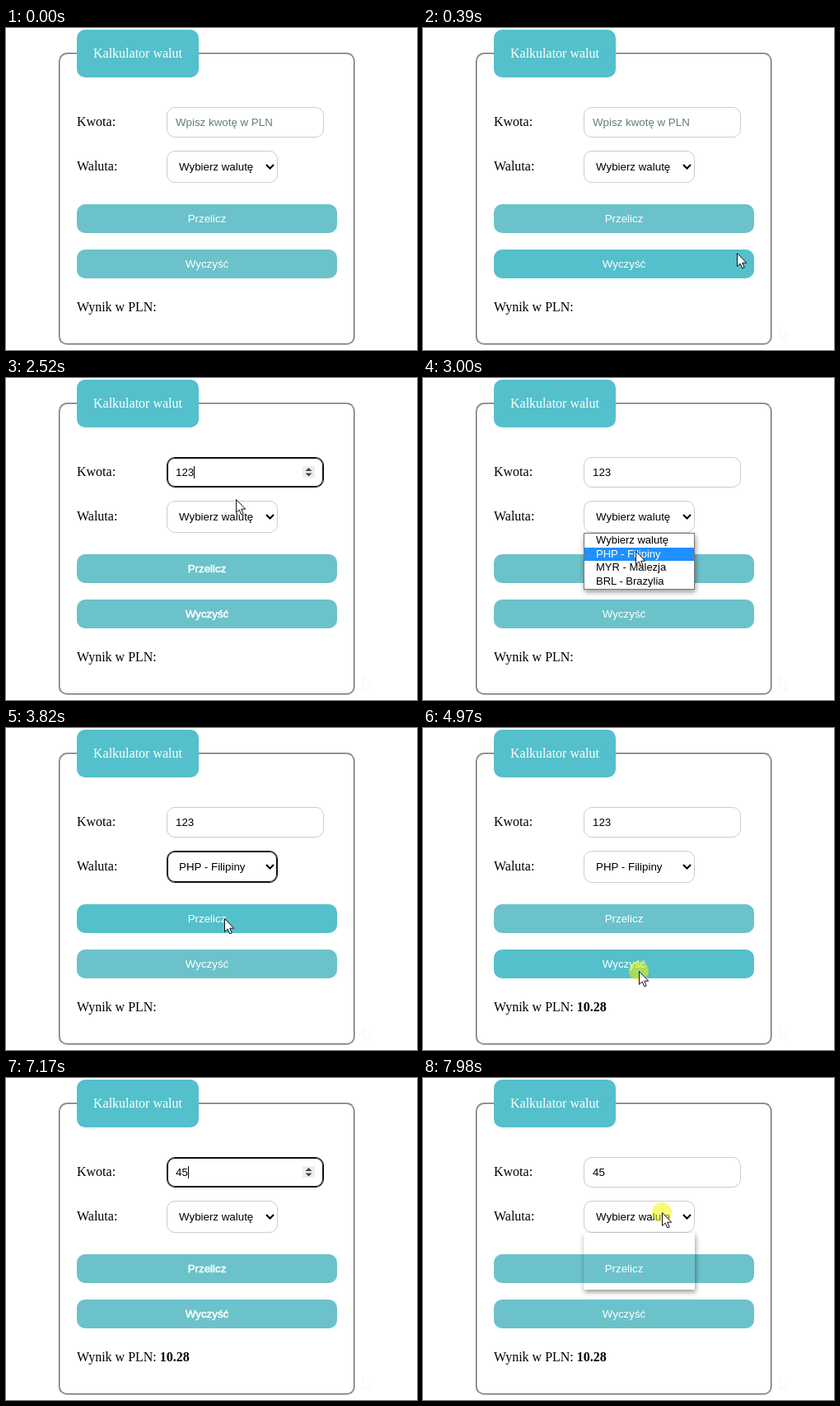
These frames come from a looping animation (499 by 391 pixels, 8000 ms). An HTML page:

```html
<!DOCTYPE html>
<html lang="pl">
<head>
<meta charset="utf-8">
<style>
html, body { margin: 0; width: 100%; height: 100%; overflow: hidden; background: #fff; }
#stage { position: relative; width: 499px; height: 391px; overflow: hidden; color: #000; }
#stage div, svg { position: absolute; box-sizing: border-box; white-space: pre; }
.serif { font: 16px/18px "Liberation Serif", "Times New Roman", serif; left: 86px; }
.sans { font: 13.333px/35px "Liberation Sans", Arial, sans-serif; }
#form { left: 64px; top: 30px; width: 360px; height: 355px; border: 2px groove #c0c0c0; border-radius: 10px; }
#legend { top: 2px; width: 148px; height: 58px; line-height: 58px; text-align: center; color: #fff; background: #54c0cb; border-radius: 10px; }
.field { left: 195px; border: 1px solid #ccc; border-radius: 10px; background: #fff; }
.field.focus { border-color: #101010; box-shadow: inset 0 0 0 1px #101010; }
#amount { top: 96px; width: 191px; height: 37px; padding-left: 10px; }
#amount.empty { color: #637d78; }
#currency { top: 149px; width: 135px; height: 39px; line-height: 37px; padding-left: 14px; }
#caret { top: 107px; width: 1px; height: 15px; background: #000; }
.button { left: 86px; width: 316px; height: 35px; border-radius: 10px; text-align: center; color: #fff; background: #6cc2ca; }
.button.hover { background: #54c0cb; }
.heavy { -webkit-text-stroke: .5px #fff; }
#list { left: 195px; top: 188px; width: 135px; height: 69px; border: 1px solid transparent; box-shadow: 1px 3px 6px rgba(0,0,0,.4); font-size: 13px; line-height: 16.6px; }
#list.open { background: #fff; border-color: #777; }
#list p { margin: 0; padding-left: 14px; visibility: hidden; }
#list.open p { visibility: visible; }
#list p.on { color: #fff; background: #1e90ff; }
</style>
</head>
<body>
<div id="stage">
  <div id="form"></div>
  <div id="legend" class="serif">Kalkulator walut</div>
  <div class="serif" style="top:105px">Kwota:</div>
  <div class="serif" style="top:159px">Waluta:</div>
  <div class="serif" style="top:330px">Wynik w PLN: <b id="result"></b></div>
  <div id="amount" class="field sans"></div>
  <div id="caret"></div>
  <div id="currency" class="field sans"></div>
  <div id="convert" class="button sans" style="top:214px">Przelicz</div>
  <div id="clear" class="button sans" style="top:269px">Wyczyść</div>
  <div id="list" class="sans"><p>Wybierz walutę</p><p>PHP - Filipiny</p><p>MYR - Malezja</p><p>BRL - Brazylia</p></div>
  <svg width="499" height="391" style="left:0;top:0">
    <path d="M316 166l4.5 4.5 4.5-4.5" fill="none" stroke="#000" stroke-width="2"/>
    <g id="spinner"><path d="M360 107h15v14h-15z" fill="#eee"/><path d="M363.5 113l4-4 4 4zM363.5 115.5l4 4 4-4z" fill="#444"/></g>
    <path id="trace" d="M433.5 362.5v15l3.5-3 2.5 5.5 2.5-1-2.5-5.5h5z" fill="none" stroke="#f3f7f7"/>
    <circle id="click" r="12" fill="#f5f500" fill-opacity=".52"/>
    <path id="arrow" d="M.5.5v16l3.7-3.4 2.5 5.8 2.5-1-2.5-5.7h5z" fill="#fff" stroke="#111"/>
    <path id="beam" d="M-2.5-7.5h2l.5.5.5-.5h2M.5-7v14M-2.5 7.5h2l.5-.5.5.5h2" fill="none" stroke="#3a2620"/>
  </svg>
</div>
<script>
const $ = id => document.getElementById(id);
const show = (id, on) => $(id).style.visibility = on ? 'visible' : 'hidden';
const during = (t, ...spans) => spans.some(([a, b]) => t >= a && t < b);

// Latest value in a list of [time, value]
const latest = (t, list) => list.reduce((v, [at, next]) => t >= at ? next : v, list[0][1]);

// Pointer moves: start, end, number of steps, target
const START = [433, 362];
const moves = [
  [190, 670, 8, [295, 125]],
  [2400, 2600, 4, [262, 169]],
  [2800, 3000, 4, [258, 210]],
  [3100, 3100, 1, [257, 211]],
  [3400, 3550, 3, [265, 229]],
  [3750, 3820, 2, [265, 231]],
  [4420, 4710, 5, [262, 295]],
  [5110, 5440, 6, [262, 106]],
  [7640, 7840, 4, [290, 163]]
];

function pointer(t) {
  let pos = START;
  for (const [a, b, n, to] of moves) {
    if (t < a) break;
    const step = b > a ? Math.floor((t - a) / (b - a) * (n - 1) + 1e-6) + 1 : n;
    const k = Math.min(1, step / n), from = pos;
    pos = from.map((v, i) => Math.round(v + (to[i] - v) * k));
  }
  return pos;
}

function draw(t) {
  const [x, y] = pointer(t);
  const visible = during(t, [190, 2130], [2400, 6570], [7640, 8000]);
  const over = (l, top, r, b) => visible && x >= l && x < r && y >= top && y < b;
  const onAmount = over(195, 96, 386, 133);
  const typing = during(t, [870, 2670], [5570, 7910]);

  const value = latest(t, [[0, ''], [1930, '1'], [2130, '12'], [2330, '123'], [5040, ''], [6110, '4'], [7170, '45']]);
  $('amount').textContent = value || 'Wpisz kwotę w PLN';
  $('amount').classList.toggle('empty', !value);
  $('amount').classList.toggle('focus', typing);
  $('caret').style.left = 206 + Math.round(value.length * 7.4) + 'px';
  show('caret', during(t, [870, 1400], [1930, 2670], [5570, 6060], [6110, 6640], [7170, 7640]));
  show('spinner', typing || onAmount);

  $('currency').textContent = during(t, [3350, 5040]) ? 'PHP - Filipiny' : 'Wybierz walutę';
  $('currency').classList.toggle('focus', during(t, [3350, 4020]));
  $('result').textContent = t >= 4090 ? '10.28' : '';

  const listed = during(t, [2670, 3350], [7980, 8000]);
  show('list', listed);
  $('list').classList.toggle('open', during(t, [2740, 3350]));
  const picked = t < 2930 ? 0 : 1;
  [...$('list').children].forEach((p, i) => p.classList.toggle('on', i === picked));

  for (const [id, top] of [['convert', 214], ['clear', 269]]) {
    $(id).classList.toggle('hover', !listed && over(86, top, 402, top + 35));
    $(id).classList.toggle('heavy', typing);
  }

  const place = `translate(${x} ${y})`;
  for (const id of ['arrow', 'beam', 'click']) $(id).setAttribute('transform', place);
  show('arrow', visible && !onAmount);
  show('beam', onAmount);
  show('click', during(t, [870, 940], [2670, 2740], [3300, 3350], [4020, 4090], [4970, 5040], [5570, 5640], [7910, 8000]));
  show('trace', t >= 190);
}

const began = performance.now();
function frame() {
  draw((performance.now() - began) % 8000);
  requestAnimationFrame(frame);
}
draw(0);
requestAnimationFrame(frame);
</script>
</body>
</html>
```
